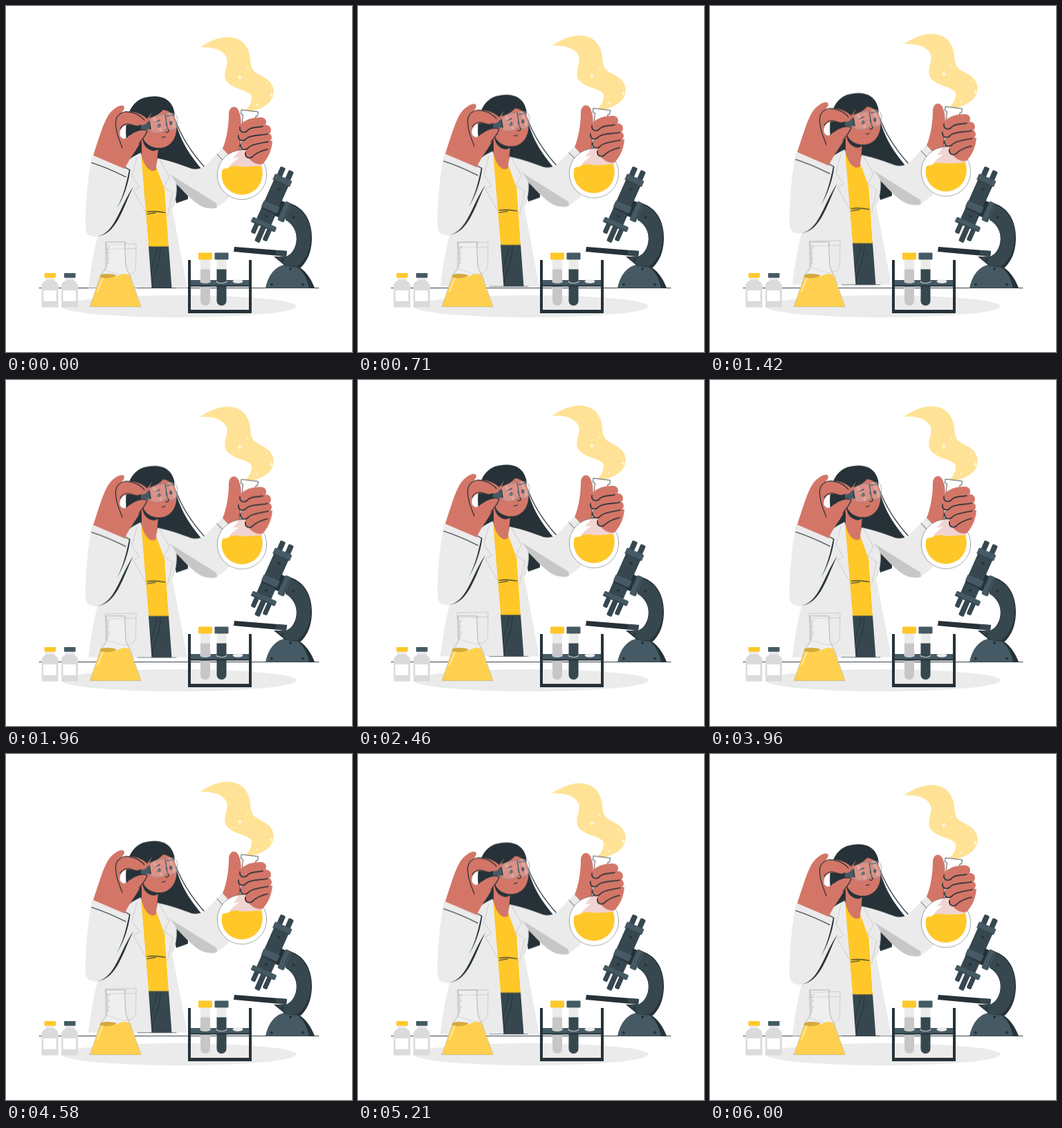
Recreate the animation shown at these times as an HTML page. Size 500 by 500 pixels, loop 6.04 s.

```html
<!DOCTYPE html>
<html lang="en">
<head>
<meta charset="utf-8">
<title>Scientist at the lab bench</title>
<style>
  html, body { margin: 0; width: 100%; height: 100%; overflow: hidden; background: #fff; }
  svg { display: block; width: 100vw; height: 100vh; }
  .ink { fill: none; stroke: #263238; stroke-linecap: round; stroke-linejoin: round; }
  .seam { fill: none; stroke: #cdcdcd; stroke-width: 1; stroke-linejoin: round; }
  .dark { fill: #263238; }
  .slate { fill: #37474f; }
  .steel { fill: #455a64; }
  .coat { fill: #ebebeb; }
  .sun { fill: #ffc727; }
  .skin { fill: #d37668; }
</style>
</head>
<body>
<svg viewBox="0 0 500 500">
  <ellipse cx="250" cy="434" rx="170" ry="16" class="coat"/>
  <path d="M48 407.500H452" class="ink" stroke-width=".9"/>

  <g id="person">
    <!-- vapour -->
    <path fill="#ffe295" d="M280 59.500C294 51 306 44.800 322 45C342 46 351 59 353 76C354 94 358 95 371 102C383 108 389 118 386 129C382 144 366 149 356 152L346 151C352 145 356 138 355 130C350 121 328 121 319 109C312 98 322 86 319 75C314 63 300 59 280 59.500Z"/>
    <g id="stars" fill="#fff"></g>

    <!-- hair behind -->
    <path class="dark" d="M174 194C171 166 177 141 198 133C218 127 238 131 242 150C246 180 257 206 284 237L262 250L263 279L246 285L236 230L190 225L175 220C180 210 175 204 174 194Z"/>
    <path class="ink" stroke-width="1.200" d="M244 163C253 189 269 213 288 234"/>

    <!-- trousers, shirt, neck -->
    <path class="slate" d="M205 345H236L240 407.500H209Z"/>
    <path class="ink" stroke-width="1" d="M211 407C211 385 222 381 223 350M218 350C216 366 210 374 209 388"/>
    <path class="sun" d="M194 214L217 222L229 258L235 347.500H206Z"/>
    <path class="ink" stroke-width="1.200" d="M204 297.500C213 296 222 297 230 298.500M203 301C208 300 212 299.500 216 299"/>
    <path class="skin" d="M196 188L221 202C218 214 219 228 217 236C210 243 199 232 196 216Z"/>
    <path class="dark" d="M197 188C200 198 208 205 222 205C219 209 213 211 207 207.500C201 204 197 198 197 188Z"/>

    <!-- face -->
    <path class="skin" d="M196 182C195 163 205 152 222 150C238 149 247 160 246.500 176C246 193 237 204 223 205C208 205 198 197 196 182Z"/>
    <path class="dark" d="M194 170C198 168 206 163 211 153C210 156 208 160 207 162C219 158 224 154 228 149C232 151 238 153 244 157C242 140 232 132 215 133C196 137 190 153 194 170Z"/>
    <ellipse cx="221" cy="173" rx="2.600" ry="3" class="dark"/>
    <ellipse cx="238.500" cy="169" rx="2.300" ry="3" class="dark"/>
    <path class="ink" stroke-width="1.700" d="M216 168L222 165M233 159L239 158"/>
    <path class="ink" stroke-width="1.200" d="M231 169C232 175 236 179 235 181C234 183 232 183 231 182M225.500 189.500C227 190 229 190 230 188.500"/>
    <path d="M207 166C211 159 225 157 230 157L233 175C229 183 214 185 209 180ZM231 157C238 153 245 155 247 160C249 168 247 176 243 178C239 180 234 179 233 175Z" fill="#fff" fill-opacity=".2" stroke="#90a4ae" stroke-width=".8"/>
    <path d="M213 161L225 181M236 155L244 176" stroke="#fff" stroke-opacity=".18" stroke-width="4"/>
    <path class="steel" d="M195 171L208 166L210 178L195 179Z"/>
    <path class="ink" stroke-width=".8" d="M207 166L209 178M230 157L233 175"/>

    <!-- coat -->
    <path class="coat" d="M178 222C184 217 190 214 195 212L197 236L206 347L210.500 407.500H119C122 382 126 357 133 331L160 270Z"/>
    <path class="coat" d="M219 220C240 224 256 231 268 235C276 237 284 235 290 229L313 205L335 232L322 278L306 290C298 294 290 292 284 290C270 284 258 268 246 257C247 270 245 281 240 292L262 407.500H239.500L235 347L231 270L217 232Z"/>
    <path fill="#c7c7c7" d="M235 242L304 285L305 291C299 294 290 292 284 290C270 284 258 268 246 257C244 251 240 246 235 242Z"/>
    <path class="seam" d="M189 219L182 246L193 262L184 267L206 305M222 222L236 247L228 261L241 270L233 304M246 257C247 271 245 282 240 292"/>
    <path class="seam" d="M143.500 344.500L188 343.500L187.500 378C186 388 178 391 166 389L144 382ZM143.500 351.500L188 350.500"/>
    <path class="ink" stroke-width=".6" d="M190 407.500H246"/>

    <!-- raised left arm -->
    <path class="coat" d="M124 216L179 237L176 262L184 262C170 291 160 325 136 333C126 335 115 332 115 321C114 289 119 245 124 216Z"/>
    <path class="ink" stroke-width="1.300" d="M124 226.500C141 232 157 239 173 247M172 233L179 237"/>
    <path class="dark" d="M160 293C170 274 174 256 178 237L179.500 237C177 257 170 277 160 293ZM132 333C158 328 164 290 184 261C169 291 160 330 132 333Z"/>
    <path class="skin" d="M126 216C134 193 141 166 150 155C156 148 166 141 170.500 145C172 149 169 151 167 154C178 150 194 154 203 162C206 167 203 172 196 172C190 176 181 170 174 172C167 174 163 181 165 188C168 193 174 193 178 187C186 181 200 176 204 181C203 188 196 194 192 201C186 212 177 222 172 235.500Z"/>
    <path class="ink" stroke-width="1.200" d="M171 153C161 156 157 164 159 175C160 188 165 195 168 205M171 153C182 152 193 157 200 165M165 177C169 171 174 169 180 171C185 173 190 175 195 172M178 187C187 180 197 177 204 180C202 188 196 193 192 199"/>

    <!-- right hand and round flask -->
    <path class="skin" d="M313 206C319 192 322 172 322 155C323 145 331 143 335 149C340 157 341 170 338 184L349 205L334 229Z"/>
    <path class="ink" stroke-width=".8" d="M305 214L318 228"/>
    <circle cx="341" cy="244" r="35.700" fill="#fff" stroke="#263238" stroke-opacity=".7" stroke-width=".6"/>
    <path fill="#f1d4d1" d="M325 225C329 214 335 208 345 208C360 207 371 215 374 224L369 232H320Z"/>
    <path class="sun" d="M313 236C321 234 325 231 333 231C348 234 357 231 369 231C373 243 370 257 361 265C349 275 333 275 322 266C312 258 310 245 313 236Z"/>
    <path fill="#fff" d="M312 229C317 218 324 213 335 212L328 220L337 219L327 227L319 236L320 228Z"/>
    <path fill="#fff" stroke="#263238" stroke-width=".8" d="M340 150L364.500 153L363.500 159L361 159L356 207H337L342.500 157L339.500 156Z"/>
    <path class="skin" d="M346 196L385 195C384 210 377 222 371 228C363 231 354 225 347 216Z"/>
    <g id="fingers"></g>
  </g>

  <!-- microscope -->
  <path class="dark" d="M404 373C424 371 438 387 446 407.500H380Z"/>
  <path class="steel" d="M375 407.500C379 388 390 374 408 373C424 374 434 389 438 407.500Z"/>
  <path class="dark" d="M404 284C430 287 443 311 442 338C441 356 436 368 426 378L404 376L387 362H405C423 355 427 320 404 309Z"/>
  <path class="slate" d="M406 286C428 289 442 312 440.500 336C440 353 433 367 421 376L406 376L390 362H406C424 353 426 322 404 309Z"/>
  <path class="dark" d="M330 348L406 354L405 362L329 355Z"/>
  <path class="slate" d="M390 353L406 354L405 362L390 360.500Z"/>
  <g transform="translate(385 283) rotate(24)">
    <g class="slate">
      <rect x="-10" y="-52" width="8" height="17" rx="2"/>
      <rect x="3" y="-52" width="8" height="17" rx="2"/>
      <rect x="-11" y="36" width="7" height="17" rx="2"/>
      <rect x="-1" y="36" width="8" height="26" rx="2"/>
      <rect x="9" y="36" width="7" height="20" rx="2"/>
      <rect x="-11" y="-30" width="23" height="64"/>
    </g>
    <path class="dark" d="M11 -7H18V17H11ZM-11 13H12V15H-11Z"/>
    <g class="steel">
      <rect x="-13" y="-39" width="27" height="9" rx="1.500"/>
      <rect x="-12" y="3" width="25" height="10" rx="1"/>
      <rect x="-17" y="31" width="38" height="8" rx="2"/>
      <rect x="17" y="-9" width="10" height="30" rx="2"/>
    </g>
    <path class="ink" stroke-width=".7" d="M25 -8V20M-13 -30H14M-17 38H20"/>
  </g>
  <g class="dark">
    <circle cx="394.500" cy="265" r="2"/><circle cx="376" cy="304" r="2"/>
    <circle cx="415.500" cy="305" r="2"/><circle cx="411" cy="380" r="2"/>
    <circle cx="384" cy="402.500" r="2"/><circle cx="429" cy="402.500" r="2"/>
    <circle cx="400" cy="367" r="1.700"/>
  </g>

  <!-- vials, tubes and rack -->
  <g id="vials"></g>
  <g id="lower"></g>
  <path class="steel" d="M266 396H352V404H266Z"/>
  <path class="dark" d="M266 403.500H352V405.500H266ZM263 367H267V439H351V367H355V444H263Z"/>
  <ellipse cx="335" cy="398" rx="7.500" ry="2.800" fill="#ebebeb"/>
  <g id="upper"></g>

  <!-- conical flask -->
  <path d="M144 341H172.500V343.500H171.500L173 374C174 381 177 385 179 389L195 434.500H121.500L137 389C142 382 146 379 146 371L145 343.500H144Z" fill="#fff" fill-opacity=".22" stroke="#9a9a9a" stroke-width=".7"/>
  <path fill="#ffd04f" d="M137 389C147 391 157 393 166 388C171 386 176 387 178.500 388.500L195 434.500H121.500Z"/>
  <path fill="#d5aa3d" d="M137 388C147 386 153 387 160 389C154 394 144 394 135.500 392Z"/>
  <path d="M140 393L132 413" fill="none" stroke="#fff" stroke-width="1" stroke-linecap="round"/>
  <path id="ticks" fill="none" stroke="#9a9a9a" stroke-width=".6"/>
</svg>

<script>
  const LOOP = 6040, RISE = 10;
  const put = (id, html) => document.getElementById(id).innerHTML = html;

  // Four-pointed sparkles: x, y, radius
  const star = ([x, y, r]) => {
    const k = r * 0.17;
    return `<path d="M${x} ${y - r}L${x + k} ${y - k}L${x + r} ${y}L${x + k} ${y + k}` +
      `L${x} ${y + r}L${x - k} ${y + k}L${x - r} ${y}L${x - k} ${y - k}Z"/>`;
  };
  put('stars', [[338, 103, 4.8], [349, 91, 2.4], [329, 111, 2], [377, 112, 2],
    [383.5, 128.5, 4.2], [363, 143, 2.6], [375, 122, 1.2], [323, 75, 1.2]].map(star).join(''));

  // Gripping fingers: left x, left y, right x, right y, bend
  const finger = ([x, y, u, v, b]) =>
    `<path d="M${x} ${y}Q${x + 9} ${y - b} ${u} ${v}" fill="none" stroke="#d37668" stroke-width="14" stroke-linecap="round"/>` +
    `<path d="M${x - 6} ${y - 1}C${x - 7} ${y + 7} ${x + 1} ${y + 9} ${x + 6} ${y + 3}` +
    `C${x + 12} ${y - 2} ${u - 6} ${v + 8} ${u + 2} ${v + 6}" class="ink" stroke-width="1.6"/>`;
  put('fingers', [[352, 213, 376, 201, 6], [345, 201, 377, 190, 9],
    [342, 188, 376, 179, 9], [344, 176, 369, 168, 9]].map(finger).join(''));

  const vial = (x, cap) =>
    `<path fill="#dbdbdb" d="M${x + 6} 393H${x + 18.5}V397C${x + 22} 399 ${x + 24} 401 ${x + 24} 405` +
    `V435.500H${x}V405C${x} 401 ${x + 2} 399 ${x + 6} 397Z"/>` +
    `<path fill="#ebebeb" d="M${x + 6} 392.500H${x + 18.5}V396H${x + 6}Z"/>` +
    `<rect x="${x + 4}" y="386" width="16.500" height="6.800" rx=".7" fill="${cap}"/>` +
    `<rect x="${x + 2.5}" y="411" width="18.500" height="15.500" fill="#fff"/>`;
  put('vials', vial(51.5, '#ffc727') + vial(80, '#455a64'));

  const tubes = [[288, '#ffc727', '#c7c7c7'], [311.5, '#455a64', '#37474f']];
  put('lower', tubes.map(([x, , fill]) =>
    `<path fill="${fill}" d="M${x - 7} 398H${x + 7}V426A7 7 0 0 1 ${x - 7} 426Z"/>`).join(''));
  put('upper', tubes.map(([x, cap, fill]) =>
    `<ellipse cx="${x}" cy="398" rx="8" ry="3" fill="#c7c7c7"/>` +
    `<path fill="${fill}" d="M${x - 7} 380H${x + 7}V398Q${x} 402 ${x - 7} 398Z"/>` +
    `<rect x="${x - 7}" y="366" width="14" height="14.500" fill="#ebebeb"/>` +
    `<rect x="${x - 10}" y="356.500" width="20" height="10" rx="1" fill="${cap}"/>`).join(''));

  let marks = '';
  for (let i = 0; i < 9; i++) marks += `M146 ${348 + i * 3}h${i % 3 ? 2.5 : 4.5}`;
  document.getElementById('ticks').setAttribute('d', marks);

  // Steady float up and back down
  document.getElementById('person').animate(
    [0, -RISE, 0].map(y => ({ transform: `translateY(${y}px)` })),
    { duration: LOOP, iterations: Infinity, easing: 'linear' });
</script>
</body>
</html>
```
